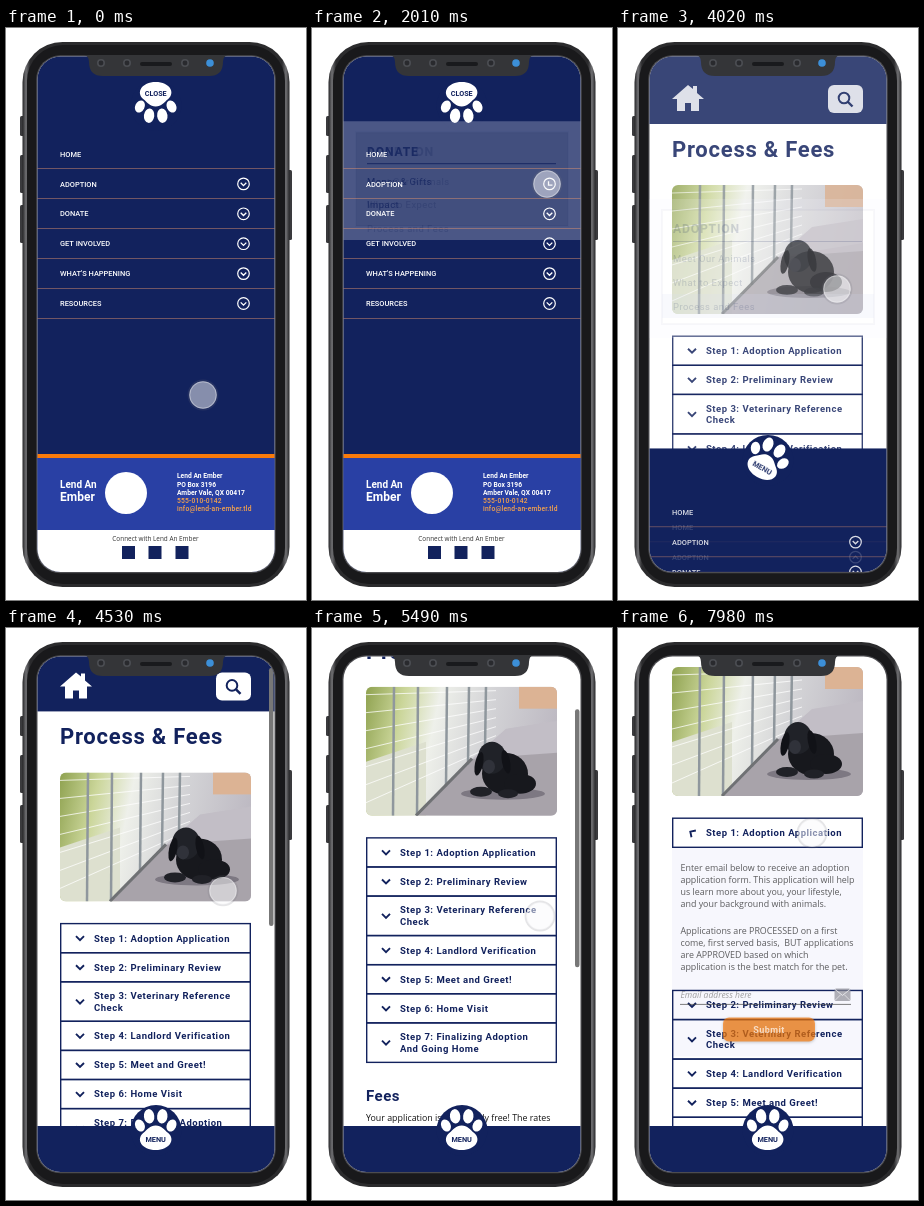
Write an HTML page with a canvas that moves like this. It is 300 by 572 pixels and loops after 8000 ms.

```html
<!DOCTYPE html>
<html lang="en">
<head>
<meta charset="utf-8">
<title>Pet adoption app</title>
<style>
  html, body { margin: 0; width: 100%; height: 100%; overflow: hidden; background: #fff; }
  canvas { display: block; width: 300px; height: 572px; }
</style>
</head>
<body>
<canvas id="stage"></canvas>
<script>
const canvas = document.getElementById('stage');
const ctx = canvas.getContext('2d');
const ratio = window.devicePixelRatio || 1;
canvas.width = 300 * ratio;
canvas.height = 572 * ratio;

const LOOP = 8000, NAVY = '#12225d', ROYAL = '#2940a4', ORANGE = '#f97b0a', TINT = '#f3f4fd';
const ROBOTO = 'Roboto, sans-serif', OPEN = '"Open Sans", sans-serif';
const MENU = ['HOME', 'ADOPTION', 'DONATE', 'GET INVOLVED', "WHAT'S HAPPENING", 'RESOURCES'];
const STEPS = [
  ['Step 1: Adoption Application'], ['Step 2: Preliminary Review'],
  ['Step 3: Veterinary Reference', 'Check'], ['Step 4: Landlord Verification'],
  ['Step 5: Meet and Greet!'], ['Step 6: Home Visit'],
  ['Step 7: Finalizing Adoption', 'And Going Home']
];
const FORM = [
  'Enter email below to receive an adoption', 'application form. This application will help',
  'us learn more about you, your lifestyle,', 'and your background with animals.', '',
  'Applications are PROCESSED on a first', 'come, first served basis,  BUT applications',
  'are APPROVED based on which', 'application is the best match for the pet.'
];
const FORM_HEIGHT = 209;
// time, x, y
const TOUCH = [
  [0, 197, 367], [850, 197, 367], [1700, 235, 156], [2500, 235, 156], [3250, 219, 278],
  [3520, 219, 278], [4020, 219, 261], [4390, 217, 261], [4860, 217, 269],
  [5490, 228, 288], [5600, 228, 288], [5900, 194, 205], [LOOP, 194, 205]
];

const progress = (t, start, duration) => Math.min(1, Math.max(0, (t - start) / duration));
const smooth = p => p * p * (3 - 2 * p);

function touchAt(t) {
  const i = TOUCH.findIndex(key => key[0] > t);
  const [a, b] = [TOUCH[i - 1], TOUCH[i]];
  const p = smooth((t - a[0]) / (b[0] - a[0]));
  return [a[1] + (b[1] - a[1]) * p, a[2] + (b[2] - a[2]) * p];
}

// Runs a drawing with its own alpha, offset and rotation.
function group(alpha, x, y, degrees, draw) {
  ctx.save();
  ctx.globalAlpha *= alpha;
  ctx.translate(x, y);
  ctx.rotate(degrees * Math.PI / 180);
  draw();
  ctx.restore();
}

function rect(x, y, w, h, color) {
  ctx.fillStyle = color;
  ctx.fillRect(x, y, w, h);
}

function roundPath(x, y, w, h, r) {
  ctx.beginPath();
  ctx.roundRect(x, y, w, h, r);
}

function roundRect(x, y, w, h, r, color) {
  roundPath(x, y, w, h, r);
  ctx.fillStyle = color;
  ctx.fill();
}

function ellipse(x, y, rx, ry, color, turn = 0) {
  ctx.beginPath();
  ctx.ellipse(x, y, rx, ry, turn, 0, 2 * Math.PI);
  ctx.fillStyle = color;
  ctx.fill();
}

function ring(x, y, r, color, width) {
  ctx.beginPath();
  ctx.arc(x, y, r, 0, 2 * Math.PI);
  ctx.strokeStyle = color;
  ctx.lineWidth = width;
  ctx.stroke();
}

function polygon(points, color) {
  ctx.beginPath();
  points.forEach(([x, y]) => ctx.lineTo(x, y));
  ctx.fillStyle = color;
  ctx.fill();
}

function line(points, color, width) {
  ctx.beginPath();
  points.forEach(([x, y]) => ctx.lineTo(x, y));
  ctx.strokeStyle = color;
  ctx.lineWidth = width;
  ctx.stroke();
}

function gradient(x0, y0, x1, y1, stops) {
  const fill = ctx.createLinearGradient(x0, y0, x1, y1);
  stops.forEach(([at, color]) => fill.addColorStop(at, color));
  return fill;
}

// y is the middle of the capital letters.
function text(string, x, y, size, color, { weight = 500, family = ROBOTO, spacing = 0, align = 'left' } = {}) {
  ctx.font = `${weight} ${size}px ${family}`;
  ctx.letterSpacing = spacing + 'px';
  ctx.textAlign = align;
  ctx.fillStyle = color;
  ctx.fillText(string, x, y + size * 0.36);
}

function chevron(x, y, degrees, size, color, width) {
  group(1, x, y, degrees, () => line([[-size, -size / 2], [0, size / 2], [size, -size / 2]], color, width));
}

function phoneBody() {
  for (const [x, y, h] of [[14, 88, 20], [14, 127, 38], [14, 177, 38], [281, 142, 70]])
    roundRect(x, y, 5, h, 1.5, '#3a3a3d');
  roundRect(16.5, 14, 267, 545, 40, gradient(16, 0, 284, 0, [
    [0, '#1b1b1d'], [0.015, '#707073'], [0.03, '#2b2b2d'],
    [0.97, '#2b2b2d'], [0.985, '#707073'], [1, '#1b1b1d']]));
  roundRect(21, 17, 258, 539, 36, '#19191b');
  roundRect(30.3, 27.3, 239.4, 518, 24, '#4c4c50');
}

function notch() {
  ctx.beginPath();
  ctx.moveTo(78, 27);
  ctx.quadraticCurveTo(83, 28, 83, 34);
  ctx.quadraticCurveTo(83, 48, 97, 48);
  ctx.lineTo(203, 48);
  ctx.quadraticCurveTo(217, 48, 217, 34);
  ctx.quadraticCurveTo(217, 28, 222, 27);
  ctx.fillStyle = '#343538';
  ctx.fill();
  for (const x of [95, 121, 179]) {
    ellipse(x, 35, 4, 4, '#4b4d52');
    ellipse(x, 35, 2.4, 2.4, '#292a2e');
  }
  roundRect(134, 34, 32, 4, 2, '#191a1d');
  ellipse(204, 35, 3.8, 3.8, '#3c8fd8');
}

function photo(y) {
  group(1, 54, y, 0, () => {
    roundPath(0, 0, 191, 129, 6);
    ctx.clip();
    rect(0, 0, 191, 129, gradient(0, 0, 191, 40, [
      [0, '#8fa250'], [0.2, '#cbd69a'], [0.38, '#eef0ea'], [0.65, '#d3d3d6'], [1, '#bdb9c2']]));
    polygon([[0, 75], [60, 55], [60, 129], [0, 129]], '#dde0cf');
    polygon([[52, 129], [106, 72], [191, 58], [191, 129]], '#a8a3aa');
    polygon([[106, 72], [140, 42], [191, 34], [191, 66]], '#c2bec6');
    rect(153, 0, 38, 22, '#dcb394');
    for (let i = 0; i < 7; i++)
      line([[0, 8 + i * 18], [130, 4 + i * 9]], 'rgba(255,255,255,.75)', 1);
    for (const [x, bottom] of [[28, 129], [52, 129], [81, 100], [103, 78], [120, 62]])
      line([[x, 0], [x - 1, bottom]], '#8f979d', 2.5);
    line([[50, 129], [106, 72]], '#6f7174', 3);
    ellipse(137, 107, 42, 6, '#7d7882');
    ellipse(139, 87, 23, 21, '#17181d');
    ellipse(154, 97, 16, 10, '#17181d');
    ellipse(115, 105, 11, 5, '#202127');
    ellipse(142, 107, 10, 4.5, '#202127');
    ellipse(126, 71, 14, 16, '#202228');
    ellipse(113, 77, 4, 12, '#111217', 0.2);
    ellipse(140, 75, 4, 12, '#111217', -0.2);
    ellipse(123, 80, 6, 7, '#30323a');
  });
}

function header() {
  rect(30, 0, 240, 96, NAVY);
  polygon([[54, 71], [70, 57], [75, 61], [75, 58], [79, 58], [79, 65], [86, 71], [81, 71],
    [81, 83], [73, 83], [73, 75], [67, 75], [67, 83], [59, 83], [59, 71]], '#fff');
  roundRect(210, 57, 35, 28, 6, '#fff');
  ring(226, 70, 5.3, NAVY, 2);
  line([[230, 74], [234.5, 78.5]], NAVY, 2.4);
}

function formFields(y) {
  FORM.forEach((row, i) =>
    text(row, 62.5, y + 20 + i * 12.1 + (i > 4 ? 3 : 0), 8.9, '#141414', { weight: 400, family: OPEN }));
  text('Email address here', 62.5, y + 147.5, 8.5, '#777', { weight: 'italic 400', family: OPEN });
  rect(62, y + 156.5, 171, 1, '#444');
  roundRect(216.5, y + 141, 16, 12.5, 1.5, '#8e8e96');
  line([[217, y + 142], [224.5, y + 148], [232, y + 142]], '#fff', 1);
  line([[217, y + 153], [222.5, y + 147.5]], '#fff', 0.8);
  line([[232, y + 153], [226.5, y + 147.5]], '#fff', 0.8);
  ctx.save();
  ctx.shadowColor = 'rgba(0,0,0,.3)';
  ctx.shadowBlur = 3;
  ctx.shadowOffsetY = 1;
  roundRect(105, y + 170, 92, 24, 6, ORANGE);
  ctx.restore();
  text('Submit', 151, y + 182, 9, '#fff', { weight: 700, spacing: 0.4, align: 'center' });
}

function page(open) {
  header();
  text('Process & Fees', 54, 121, 22, NAVY, { weight: 700, spacing: 0.75 });
  photo(157);

  let y = 308.2;
  const formTop = y + 29.2;
  group(open, 0, 0, 0, () => rect(54, formTop, 191, FORM_HEIGHT, TINT));
  STEPS.forEach((lines, i) => {
    const height = lines.length > 1 ? 39.5 : 29.1;
    const middle = y + height / 2;
    ctx.strokeStyle = NAVY;
    ctx.lineWidth = 1.4;
    ctx.strokeRect(54.7, y, 189.6, height);
    chevron(74, middle, i ? 0 : 180 * open, 4, NAVY, 1.9);
    lines.forEach((row, n) =>
      text(row, 88, middle + (n - (lines.length - 1) / 2) * 11.5, 9.5, NAVY, { weight: 700, spacing: 0.5 }));
    y += height + (i ? 0 : FORM_HEIGHT * open);
  });
  group(open, 0, 0, 0, () => formFields(formTop));

  text('Fees', 54, y + 33, 15, NAVY, { weight: 700, spacing: 0.5 });
  ['Your application is completely free! The rates', 'below help to cover the care of our pets']
    .forEach((row, i) => text(row, 54, y + 55 + i * 12, 8.85, '#141414', { weight: 400, family: OPEN }));
}

function menuRows(push, turn) {
  MENU.forEach((label, i) => {
    const y = 126 + i * 29.9 + (i > 1 ? push : 0);
    text(label, 54, y, 7.45, '#fff');
    if (i) {
      ring(237.5, y, 5.8, '#fff', 1.2);
      chevron(237.5, y + 0.3, i === 1 ? turn : 0, 2.8, '#fff', 1.3);
    }
    rect(31, Math.round(y + 14), 238, 1, 'rgba(230,150,110,.45)');
  });
}

function footer() {
  rect(30, 426, 240, 4, ORANGE);
  rect(30, 430, 240, 72, ROYAL);
  rect(30, 502, 240, 44, '#fff');
  text('Lend An', 54, 456, 10, '#fff', { weight: 700 });
  text('Ember', 54, 469, 12, '#fff', { weight: 700 });
  ellipse(120, 465, 21, 21, '#fff');
  ['Lend An Ember', 'PO Box 3196', 'Amber Vale, QX 00417', '555-010-0142', 'info@lend-an-ember.tld']
    .forEach((row, i) => text(row, 171, 448 + i * 8.2, 6.7, i < 3 ? '#fff' : '#f9a44a',
      { weight: i < 3 ? 700 : 500, spacing: i < 3 ? 0 : 0.2 }));
  text('Connect with Lend An Ember', 149.5, 511, 6.4, '#333', { weight: 400, family: OPEN, align: 'center' });
  for (const x of [122.5, 149, 176]) rect(x - 6.5, 518, 13, 13, NAVY);
}

// The band has a hole for the card, so that the two fade as one layer.
function submenuPlate(y, expand, highlighted) {
  const height = 112 + 27 * expand;
  ctx.beginPath();
  ctx.rect(31, y, 238, height);
  ctx.rect(44, y + 11, 212, height - 25);
  ctx.fillStyle = TINT;
  ctx.fill('evenodd');
  rect(44, y + 11, 212, height - 25, `rgba(255,255,255,${0.75 + 0.25 * expand})`);
  ctx.strokeStyle = 'rgba(30,40,100,.2)';
  ctx.lineWidth = 2;
  ctx.strokeRect(44, y + 11, 212, height - 25);
  if (highlighted) rect(44, y + 95, 212, 24, '#d5d9f0');
}

function submenuText(y, title, items) {
  text(title, 55, y + 30, 12.2, NAVY, { weight: 700, spacing: 0.8 });
  rect(55, y + 42, 189, 1, NAVY);
  items.forEach((item, i) => text(item, 55, y + 60 + i * 23.7, 9.4, NAVY, { weight: 400, spacing: 0.5 }));
}

function paw(y, closed) {
  group(1, 149.7, y, 180 * (1 - closed), () => {
    for (const side of [-1, 1]) {
      ellipse(side * 15.8, -3, 4.7, 6.3, '#fff', side * 0.45);
      ellipse(side * 6.6, -12.2, 5.2, 7.2, '#fff', side * 0.12);
    }
    ctx.beginPath();
    ctx.moveTo(0, -3);
    ctx.bezierCurveTo(6, -3, 8, 1, 12.5, 4.5);
    ctx.bezierCurveTo(20, 11, 14, 21.5, 0, 21.5);
    ctx.bezierCurveTo(-14, 21.5, -20, 11, -12.5, 4.5);
    ctx.bezierCurveTo(-8, 1, -6, -3, 0, -3);
    ctx.fillStyle = '#fff';
    ctx.fill();
    const label = { weight: 700, align: 'center' };
    group(closed, 0, 11, 0, () => text('MENU', 0, 0, 7.3, NAVY, label));
    group(1 - closed, 0, 10.5, 180, () => text('CLOSE', 0, 0, 7.2, NAVY, label));
  });
}

function touch(x, y) {
  ring(x, y, 14.2, 'rgba(110,110,125,.18)', 2.5);
  ellipse(x, y, 13.8, 13.8, 'rgba(250,250,252,.5)');
  ring(x, y, 13.2, 'rgba(255,255,255,.35)', 1);
}

function screen(t) {
  const expand = progress(t, 1860, 600);
  const close = progress(t, 3520, 600);
  const scroll = 117 * progress(t, 4390, 1310) + progress(t, 6600, 60);
  const open = progress(t, 5950, 600) - progress(t, 7792, 600);
  const pawY = 75.5 + 425 * close;

  rect(30, 27, 240, 519, '#fff');
  if (close) group(close, 0, -scroll, 0, () => page(open));
  if (t > 4390 && t < 5750) roundRect(263, 34 + scroll * 0.48, 4.5, 258, 2.2, '#777');

  const panelTop = 28 + 470 * close;
  rect(30, panelTop, 240, 546 - panelTop, NAVY);
  ellipse(150, pawY + 2, 25.5, 25.5, NAVY);
  if (close < 1) {
    const slide = 429 * close;
    group(1, 0, slide, 0, footer);
    if (expand) {
      const bandTop = 67 + 104 * expand;
      const shown = expand * (1 - close);
      group(shown, 0, 0, 0, () => submenuPlate(bandTop, expand, t > 3100));
      group(shown, 0, 0, 0, () =>
        submenuText(bandTop, 'ADOPTION', ['Meet Our Animals', 'What to Expect', 'Process and Fees']));
      group(1 - expand, 0, 0, 0, () => submenuText(bandTop, 'DONATE', ['Money & Gifts', 'Impact']));
    }
    group(1 - close, 0, 447 * close, 0, () =>
      menuRows(139 * smooth(progress(expand, 0.28, 0.72)), 180 * expand));
    if (close) group(close, 0, slide, 0, () => menuRows(0, 0));
  } else {
    group(1, 0, 429, 0, () => menuRows(0, 0));
  }
  paw(pawY, close);
  touch(...touchAt(t));
}

function render() {
  const t = performance.now() % LOOP;
  ctx.setTransform(ratio, 0, 0, ratio, 0, 0);
  rect(0, 0, 300, 572, '#fff');
  phoneBody();
  ctx.save();
  roundPath(31.5, 28.5, 237, 515.5, 23);
  ctx.clip();
  screen(t);
  ctx.restore();
  notch();
  requestAnimationFrame(render);
}
render();
</script>
</body>
</html>
```
